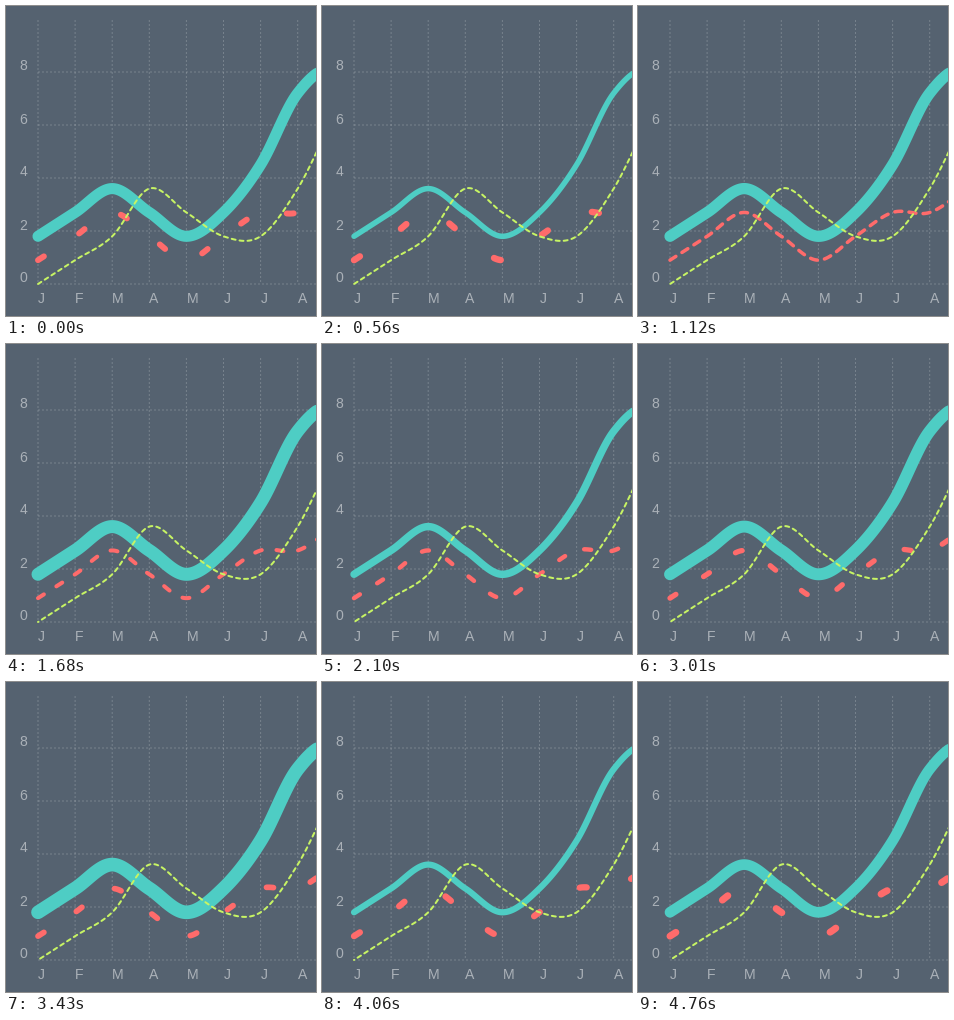
These frames come from a looping animation (310 by 310 pixels, 4.83 s). A matplotlib script:

```python
import math

import matplotlib.pyplot as plt
import numpy as np
from matplotlib.animation import FuncAnimation

SIZE = 310
PX = 0.72  # points per pixel at 100 dpi
FRAMES, STEP = 69, 70

X0, DX = 32, 37.1
Y0, UNIT = 278, 26.5
TOP = 14

BACK, TEAL, RED, LIME = "#556270", "#4ECDC4", "#FF6B6B", "#C7F464"

START = 1105    # ms at which the dash cycle restarts
SPREAD = 3680   # red dashes drifting apart
BOUNCE = 1840   # teal line swelling and thinning
MARCH = 920     # lime dashes marching along

plt.rcParams["lines.scale_dashes"] = False
plt.rcParams["path.simplify"] = False
plt.rcParams["font.family"] = "Liberation Sans"

fig = plt.figure(figsize=(3.1, 3.1), dpi=100, facecolor=BACK)
ax = fig.add_axes([0, 0, 1, 1])
ax.set_xlim(0, SIZE)
ax.set_ylim(SIZE, 0)
ax.axis("off")


def smooth(values):
    """Catmull-Rom curve through the values, in stage pixels."""
    points = np.array([(X0 + DX * i, Y0 - UNIT * v)
                       for i, v in enumerate(values)])
    padded = np.concatenate([points[:1], points, points[-1:]])
    slope = (padded[2:] - padded[:-2]) / 2
    t = np.linspace(0, 1, 40, endpoint=False)[:, None]
    parts = [(2*t**3 - 3*t**2 + 1) * points[i] + (t**3 - 2*t**2 + t) * slope[i]
             + (3*t**2 - 2*t**3) * points[i + 1] + (t**3 - t**2) * slope[i + 1]
             for i in range(len(points) - 1)]
    return np.concatenate(parts).T


def grid_line(xs, ys):
    ax.plot(xs, ys, color="white", alpha=0.2, lw=PX, snap=False,
            linestyle=(0, (2 * PX, 2 * PX)), dash_capstyle="butt")


def label(x, y, text, align):
    ax.text(x, y, text, size=14 * PX, color="white", alpha=0.5,
            ha=align, va="baseline")


def series(values, color, width):
    line, = ax.plot(*smooth(values), color=color, lw=width * PX, snap=False,
                    solid_capstyle="round", solid_joinstyle="round",
                    dash_capstyle="round", dash_joinstyle="round")
    return line


def set_dash(line, on, off, shift=0):
    line.set_linestyle((shift * PX, (on * PX, off * PX)))


for i, month in enumerate("JFMAMJJA"):
    x = X0 + DX * i
    grid_line([x, x], [TOP, Y0])
    label(x, 297, month, "left")

for value in range(0, 10, 2):
    y = Y0 - UNIT * value
    grid_line([X0, SIZE], [y, y])
    label(21.3, y - 1.5, str(value), "right")

teal = series([1.8, 2.7, 3.6, 2.7, 1.8, 2.7, 4.5, 7.2, 8.1, 6.3], TEAL, 5)
red = series([0.9, 1.8, 2.7, 1.8, 0.9, 1.8, 2.7, 2.7, 3.6, 4.5], RED, 3)
lime = series([0, 0.9, 1.8, 3.6, 2.7, 1.8, 1.8, 3.6, 6.3, 8.1], LIME, 2)


def draw(frame):
    t = frame * STEP - START

    swell = 0.5 + 0.5 * math.cos(2 * math.pi * (t / BOUNCE - 0.2))
    teal.set_linewidth((5.5 + 8.5 * swell) * PX)

    apart = t / SPREAD % 1
    red.set_linewidth((3.5 + 3.5 * apart) * PX)
    set_dash(red, 7, 7 + 50 * apart)

    set_dash(lime, 4, 4, -20 * (t / MARCH % 1) % 8)
    return teal, red, lime


anim = FuncAnimation(fig, draw, frames=FRAMES, interval=STEP,
                     init_func=lambda: draw(0), repeat=True, repeat_delay=0)
plt.show()
```
